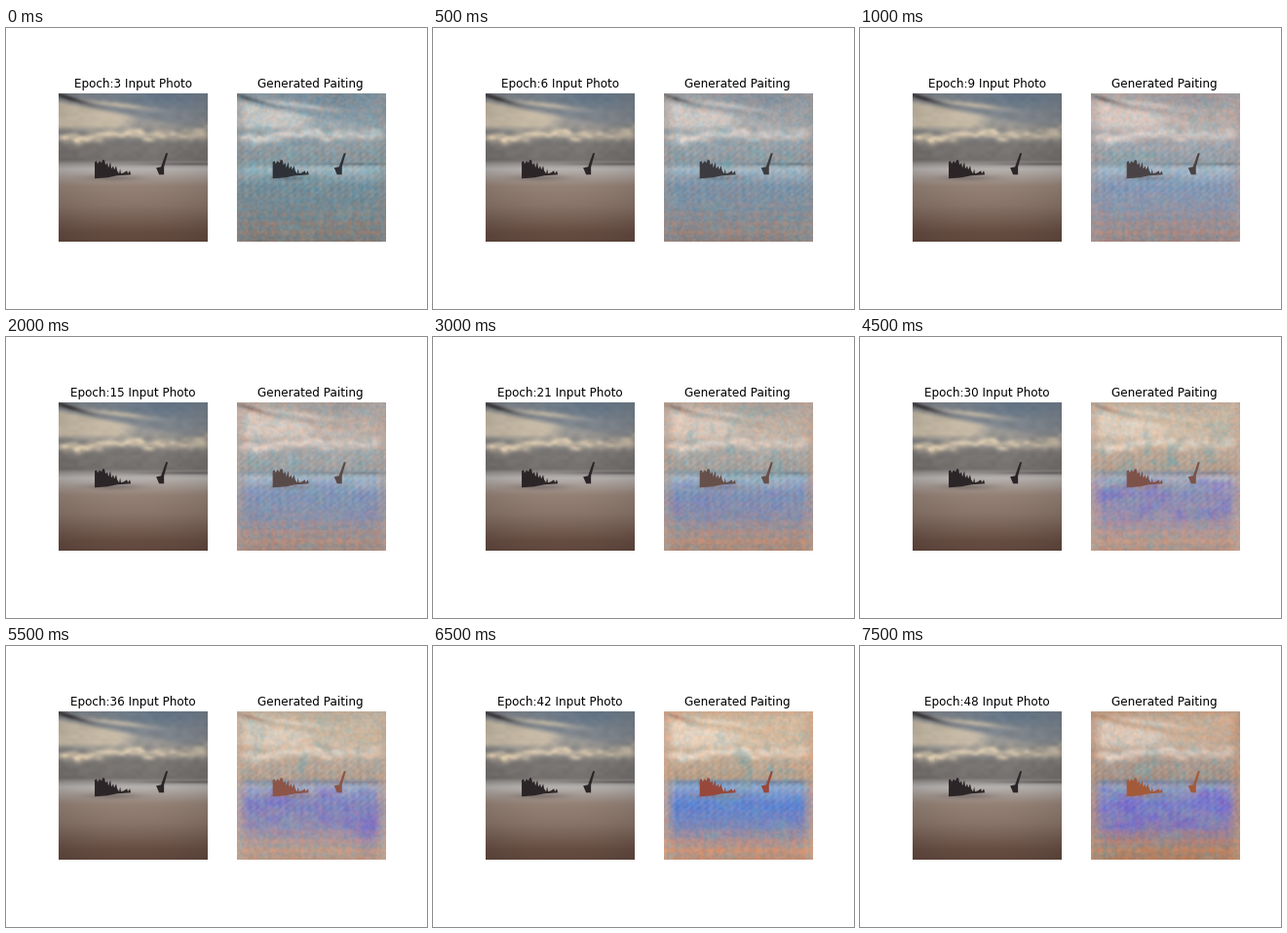
These frames come from a looping animation (432 px wide and 288 px high, 8 s). A matplotlib script:

```python
import numpy as np
import matplotlib.pyplot as plt
from matplotlib.animation import FuncAnimation
from matplotlib.patches import Polygon

N = 152
FRAMES = 16
Y, X = np.mgrid[0:N, 0:N] + 0.5

# sky, cloud, haze, glow, deep water, foot, wreck
PHOTO = "#80858b #dccaae #74716f #aeaaa8 #8f7d72 #694f44 #2b2527"
PAINTINGS = {
    3: "#8c9ba4 #dad5cf #8f9ca3 #a3b8c1 #748c98 #84807d #2e3238",
    9: "#b9aca8 #dfd1ca #a0a6ae #abbac8 #8699b4 #a08c8b #4a4346",
    21: "#c0b0a2 #e0d0c4 #aaa8a5 #a5b6c4 #7f90b4 #b08f80 #66504a",
    27: "#cdb9a4 #e6d5c4 #bba797 #b3b3bd #938eb4 #b9978a #75504a",
    36: "#c8b6a0 #e2d2c2 #b8a799 #a4abc0 #8488bb #bb9c8c #8c5547",
    42: "#d2b99e #ead9c8 #bda792 #8ea8cc #5f85d0 #c5947c #97483a",
    48: "#c6ab95 #e0d0c3 #ab9a90 #979fbd #7c80c8 #b48468 #a35a38",
}
EPOCHS = list(PAINTINGS)
VIOLET = np.array([116, 102, 206]) / 255
TEAL = np.array([122, 166, 172]) / 255

WRECK = [(37, 87), (37, 70), (39, 69), (40, 72), (42, 69), (44, 71),
         (45, 68), (47, 68), (48, 73), (50, 71), (51, 76), (53, 70),
         (54, 77), (56, 74), (57, 78), (59, 74), (60, 79), (62, 82),
         (63, 77), (64, 82), (67, 81), (70, 79), (71, 82), (73, 79),
         (74, 83), (60, 84), (50, 86)]
BOAT = [(100, 76), (105, 75), (110, 61), (112, 61), (108, 75), (108, 83),
        (103, 83)]


def palette(text):
    return np.array([[int(c[i:i + 2], 16) for i in (1, 3, 5)]
                     for c in text.split()]) / 255


def noise(rng, nx, ny):
    """Smooth random field with nx by ny cells, roughly -1 to 1."""
    grid = rng.uniform(-1, 1, (ny + 1, nx + 1))
    t = (np.arange(N) + 0.5) / N
    rows = np.array([np.interp(t * nx, np.arange(nx + 1), g) for g in grid])
    return np.array([np.interp(t * ny, np.arange(ny + 1), c)
                     for c in rows.T]).T


def blob(x, y, w, h):
    return np.exp(-((X - x) / w) ** 2 - ((Y - y) / h) ** 2)


def ramp(v, a, b):
    t = np.clip((v - a) / (b - a), 0, 1)
    return t * t * (3 - 2 * t)


def mix(img, color, mask):
    m = np.clip(mask, 0, 1)[..., None]
    return img * (1 - m) + color * m


def make_masks():
    rng = np.random.default_rng(4)
    puffs = np.zeros((N, N))
    for x in np.linspace(0, N, 30):
        y = 43 + 3 * np.sin(x / 14) + rng.uniform(-4, 4)
        puffs += rng.uniform(0.25, 0.75) * blob(x, y, rng.uniform(4, 8),
                                                rng.uniform(3, 6))
    detail = noise(rng, 26, 40)
    bank = puffs * (0.85 + 0.3 * detail)
    edge = 78 - 0.5 * Y + 7 * noise(rng, 5, 12)
    veil = ramp(Y, 5 + 0.2 * X, 13 + 0.2 * X) * ramp(-Y, -42, -32)
    veil *= 0.25 + 0.5 * ramp(-X, -edge - 22, -edge + 8)
    wisps = blob(62, 13 + 0.12 * (X - 62), 34, 3) * 0.6
    streak = blob(8, 5 + 0.3 * (X - 8), 22, 2.6)
    blue = blob(108, 4, 58, 15)
    return bank, veil + wisps, streak, blue, detail


BANK, VEIL, STREAK, BLUE, DETAIL = make_masks()
SKY = ramp(-Y, -72, -66)
SEA = 1 - SKY


def scene(colors, shade):
    """Sky, clouds and water; shade sets the strength of the dark accents."""
    sky, cloud, haze, glow, deep, foot, wreck = colors
    stops = [0, 28, 54, 69, 73, 78, 95, 115, 142, N]
    bands = np.array([sky, sky, haze, haze * 0.95, glow * 0.84, glow, deep,
                      0.75 * deep + 0.25 * foot, foot, foot * 0.96])
    img = np.stack([np.interp(Y, stops, c) for c in bands.T], axis=-1)
    img = mix(img, np.array([0.36, 0.45, 0.54]), BLUE * shade * 0.85)
    img = mix(img, cloud, VEIL)
    img = mix(img, cloud, BANK * 0.9)
    img = mix(img, wreck, STREAK * (0.35 + 0.5 * shade))
    img = mix(img, wreck, blob(140, 73, 55, 1.3) * (0.15 + 0.4 * shade))
    img = mix(img, wreck, blob(56, 87, 26, 3) * 0.3)
    return img + 0.02 * (DETAIL * SKY)[..., None]


def photo():
    img = scene(palette(PHOTO), 0.75)
    r2 = ((X - 76) / 76) ** 2 + ((Y - 72) / 80) ** 2
    return np.clip(img * (1.05 - 0.1 * r2)[..., None], 0, 1)


KEYS = np.array([palette(p) for p in PAINTINGS.values()])


def painting_colors(epoch):
    flat = KEYS.reshape(len(EPOCHS), -1)
    return np.array([np.interp(epoch, EPOCHS, c)
                     for c in flat.T]).reshape(-1, 3)


def painting(epoch):
    rng = np.random.default_rng(epoch)
    age = epoch / 48
    colors = painting_colors(epoch)
    img = scene(colors, 0.55 * (1 - age) ** 1.2)

    # blotches of violet in the water and teal in the sky
    patch = ramp(noise(rng, 12, 18) + 0.6 * noise(rng, 30, 30), -0.5, 0.9)
    water = ramp(Y, 74, 84) * ramp(-Y, -132, -112)
    violet = np.interp(epoch, EPOCHS, [0, 0.05, 0.2, 0.4, 0.45, 0.15, 0.65])
    img = mix(img, VIOLET, patch * water * violet)
    img = mix(img, VIOLET, blob(134, 117, 14, 18)
              * np.interp(epoch, [30, 36, 42], [0, 0.6, 0]))
    teal = ramp(noise(rng, 16, 12) + 0.5 * noise(rng, 40, 30), 0.1, 1)
    img = mix(img, TEAL, teal * (0.25 + 0.35 * blob(76, 64, 60, 20)))

    # warm border
    side = np.minimum(X, N - X)
    rim = np.maximum(ramp(-side, -14, -1), 0.8 * ramp(-Y, -9, -1))
    img = mix(img, 0.6 * colors[5] + 0.4 * colors[0], rim * (0.4 + 0.35 * age))

    # plaid, slanted strokes and grain
    plaid = np.cos(2 * np.pi * X / 9.5) + np.cos(2 * np.pi * Y / 9.5)
    warm = np.array([1, -0.1, -0.6])
    img += (0.028 * plaid * (0.25 + 0.75 * ramp(Y, 105, 130)))[..., None] * warm
    slant = np.sin(2 * np.pi * (X + 0.6 * Y) / 7.5) * np.sin(2 * np.pi * Y / 12)
    img += 0.025 * (slant * ramp(Y, 45, 58)
                    * ramp(-Y, -120, -100))[..., None]
    img += (0.05 * noise(rng, 50, 50))[..., None] * warm
    img += 0.03 * noise(rng, 76, 76)[..., None]
    return np.clip(img, 0, 1)


def add_panel(ax, img, color):
    ax.axis("off")
    im = ax.imshow(img, extent=(0, N, N, 0))
    shapes = [ax.add_patch(Polygon(p, color=color, lw=0))
              for p in (WRECK, BOAT)]
    return im, shapes


fig, (left, right) = plt.subplots(1, 2, figsize=(6, 4), dpi=72)
fig.subplots_adjust(left=0.125, right=0.9, bottom=0.125, top=0.88, wspace=0.2)
add_panel(left, photo(), palette(PHOTO)[-1])
canvas, hulls = add_panel(right, painting(3), painting_colors(3)[-1])
title = left.set_title("Epoch:3 Input Photo", fontsize=12)
right.set_title("Generated Paiting", fontsize=12)


def update(i):
    epoch = 3 * (i + 1)
    title.set_text(f"Epoch:{epoch} Input Photo")
    canvas.set_data(painting(epoch))
    for h in hulls:
        h.set_color(painting_colors(epoch)[-1])
    return [title, canvas, *hulls]


anim = FuncAnimation(fig, update, frames=FRAMES, interval=500, repeat=True)
plt.show()
```
